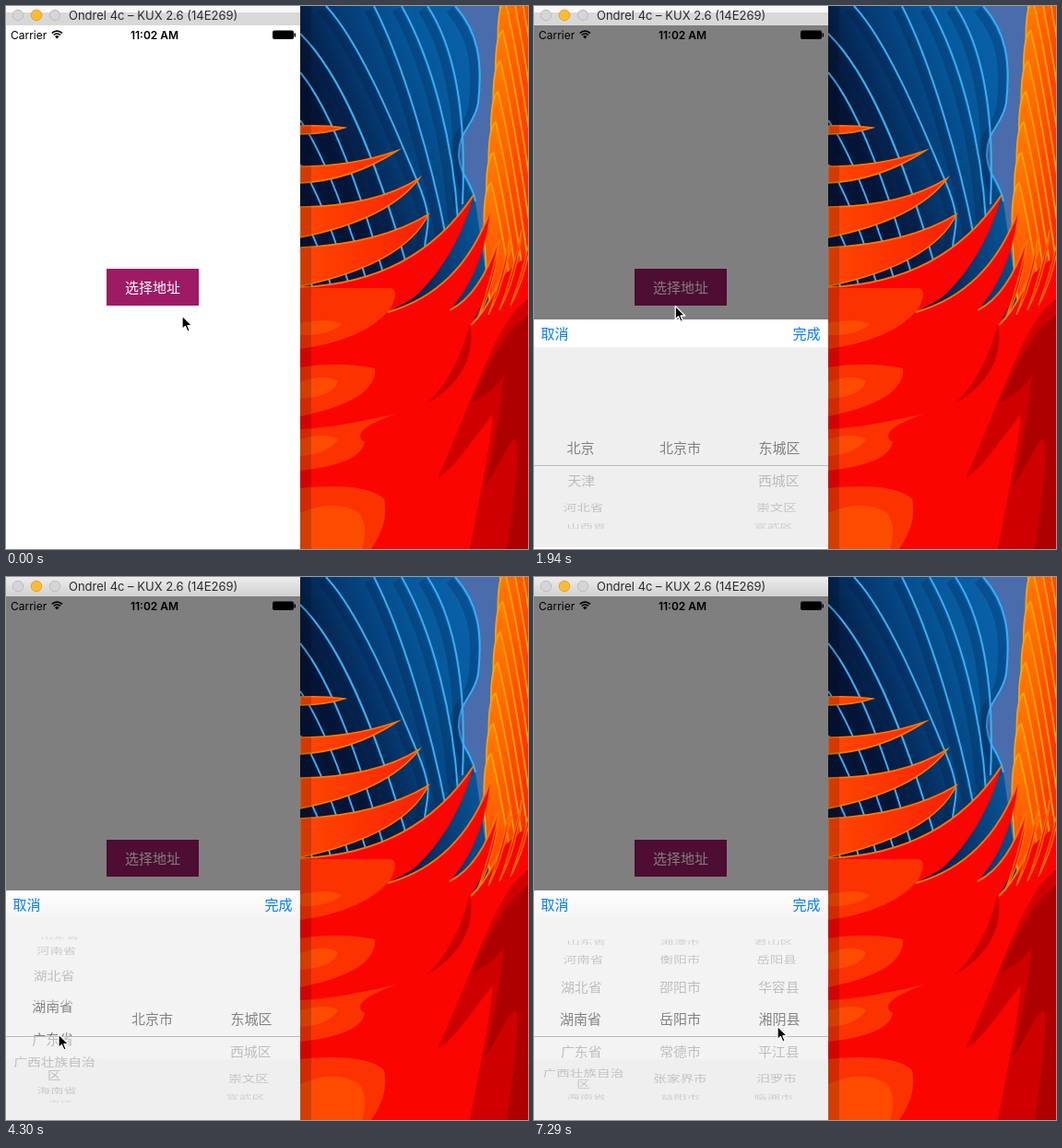
Animation of 566 by 589 pixels, one loop 8 s. Source, as an HTML page with a canvas:

```html
<!DOCTYPE html>
<html lang="zh-CN">
<head>
<meta charset="utf-8">
<title>选择地址</title>
<style>
html, body { margin: 0; width: 566px; height: 589px; overflow: hidden; background: #fff; }
canvas { display: block; }
</style>
</head>
<body>
<canvas id="stage" width="566" height="589"></canvas>
<script>
const stage = document.getElementById('stage');
const LOOP = 8000, STEP = 148.6;
const HAN = '"Noto Sans CJK SC", "Noto Sans CJK", "Noto Sans CJK JP", sans-serif';
const LATIN = 'Inter, Roboto, sans-serif';
let c = stage.getContext('2d');

const PROVINCES = '北京 天津 河北省 山西省 内蒙古自治区 辽宁省 吉林省 黑龙江省 上海 江苏省 浙江省 安徽省 福建省 江西省 山东省 河南省 湖北省 湖南省 广东省 广西壮族自治区 海南省 重庆 四川省 贵州省'.split(' ');
const CITIES = ['北京市', '长沙市 株洲市 湘潭市 衡阳市 邵阳市 岳阳市 常德市 张家界市 益阳市 郴州市'].map(s => s.split(' '));
const AREAS = [
  '东城区 西城区 崇文区 宣武区 朝阳区',
  '芙蓉区 天心区 岳麓区 开福区 雨花区',
  '岳阳楼区 云溪区 君山区 岳阳县 华容县 湘阴县 平江县 汨罗市 临湘市'
].map(s => s.split(' '));

// Key lists: time, then one or more values
const CURSOR = [
  [0, 191, 336], [150, 190, 334], [740, 163, 299], [1790, 163, 299], [1935, 153, 326],
  [2380, 66, 533], [2980, 62, 512], [3270, 60, 490], [3560, 58, 528], [3860, 57, 500],
  [4300, 57, 496], [4600, 57, 496], [5050, 168, 508], [5490, 168, 479], [5790, 168, 479],
  [6090, 264, 520], [6390, 264, 520], [6840, 264, 496], [7290, 264, 487]
];
const PROVINCE_ROLL = [[2230, 0], [2380, .7], [2680, 4], [2980, 7.6], [3270, 10.4], [3560, 12.5], [3860, 15], [4160, 17.1], [4300, 17.42], [4460, 17]];
const CITY_ROLL = [[4900, 0], [5050, .6], [5340, 3.2], [5490, 4.21], [5640, 4.75], [5790, 5]];
const AREA_ROLL = [[6240, 0], [6390, .8], [6690, 3.7], [6840, 4.3], [6990, 4.3], [7140, 4.7], [7280, 5]];

function tween(keys, t) {
  const i = keys.findIndex(k => k[0] > t);
  if (i < 0) return keys[keys.length - 1].slice(1);
  if (i === 0) return keys[0].slice(1);
  const a = keys[i - 1], b = keys[i], p = (t - a[0]) / (b[0] - a[0]);
  return a.slice(1).map((v, n) => v + (b[n + 1] - v) * p);
}

function rect(x, y, w, h, fill) {
  c.fillStyle = fill;
  c.fillRect(x, y, w, h);
}

function disc(x, y, r, fill, line) {
  c.beginPath();
  c.arc(x, y, r, 0, 7);
  c.fillStyle = fill;
  c.fill();
  c.strokeStyle = line;
  c.lineWidth = 1;
  c.stroke();
}

function fade(x0, y0, x1, y1, ...stops) {
  const g = c.createLinearGradient(x0, y0, x1, y1);
  stops.forEach((s, i) => g.addColorStop(i / (stops.length - 1), s));
  return g;
}

function text(s, x, y, font, fill, align = 'left') {
  c.font = font;
  c.fillStyle = fill;
  c.textAlign = align;
  c.fillText(s, x, y);
}

const han = (s, x, y, fill, align = 'center') => text(s, x, y + 5.7, '15px ' + HAN, fill, align);

function shape(d, fill, line, width = 1) {
  const p = new Path2D(d);
  if (fill) { c.fillStyle = fill; c.fill(p); }
  if (line) { c.strokeStyle = line; c.lineWidth = width; c.stroke(p); }
}

function wallpaper() {
  rect(319, 0, 247, 589, fade(325, 90, 500, 20, '#041536', '#053a72', '#055799', '#0a62ab'));
  // dark folds and bright ridges
  const ridges = [
    'M487 0C512 28 517 60 512 105C508 130 490 135 491 163C493 185 506 192 509 212',
    'M457 0C490 50 499 130 495 215',
    'M429 0C463 60 485 150 490 232',
    'M399 0C430 60 462 170 477 250',
    'M347 0C385 40 425 140 446 190S453 240 454 268',
    'M319 30C362 72 400 160 437 290',
    'M319 72C352 112 385 200 413 305',
    'M319 124C345 160 374 240 394 308',
    'M319 172C340 204 360 260 374 310',
    'M319 226C334 246 346 280 354 310',
    'M319 277L334 308'
  ];
  shape(ridges[0] + 'L520 290L560 240V0Z', '#4a6cab');
  ridges.forEach(d => {
    c.save();
    c.translate(-6, 4);
    shape(d, null, 'rgba(0,18,55,.22)', 9);
    c.restore();
    shape(d, null, '#39aef4', 2);
  });

  // right-hand plume: overlapping leaves, each lower and further left
  for (let i = -9; i < 7; i++) {
    const x = 536 - i * 2.5, y = i * 33 + 2;
    shape(`M${x + 5} ${y - 8}C${x - 6} ${y} ${x - 3} ${y + 50} ${x + 1} ${y + 100}Q${x + 12} ${y + 190} ${x + 26} ${y + 250}L${x + 44} ${y + 220}Q${x + 20} ${y + 50} ${x + 5} ${y - 8}Z`,
      fade(x, y, x + 12, y + 240, '#ff7a00', '#ff4300', '#ec1700'), '#ffa300', 1.8);
  }

  // blades reaching in from the left
  [
    'M319 130Q345 129 367 132Q345 139 319 139Z',
    'M319 174Q375 174 424 157Q375 189 319 192Z',
    'M319 218Q400 217 448 187Q414 232 319 251Z',
    'M319 262Q405 258 458 226Q432 280 319 304Z'
  ].forEach(d => shape(d, fade(319, 0, 450, 0, '#ff4700', '#fa2200'), '#ff7a00', 1.5));

  // red body and the spikes along its top
  const red = '#fa0500';
  shape('M319 305C400 302 464 270 507 205C497 245 472 292 440 318L414 332C470 316 505 277 525 222C521 265 504 306 481 330C505 318 522 290 534 253C530 290 520 320 504 346C520 334 532 306 542 290L566 270V589H319Z', red);
  shape('M319 305C400 302 464 270 507 205M414 332C470 316 505 277 525 222M481 330C505 318 522 290 534 253M504 346C524 328 540 290 549 258', null, '#ff7600', 2);
  for (let i = 0; i < 4; i++) {
    const x = 535 + i * 12, y = 252 - i * 5;
    shape(`M${x} ${y}Q${x - 4} ${y + 50} ${x - 24} ${y + 88}Q${x - 8} ${y + 45} ${x} ${y}Z`, red, '#ff7600', 1.3);
  }

  // warm glows
  shape('M319 306H418Q426 310 417 328Q390 362 319 372Z', '#fc3200');
  shape('M319 344Q350 338 364 345Q350 358 319 357Z', '#ff4b00');
  shape('M319 392Q360 385 400 393Q403 428 319 445Z', '#fc3200');
  shape('M319 408Q345 398 360 407Q355 424 319 426Z', '#ff4b00');
  shape('M319 459Q355 458 424 442Q370 461 389 473Q385 497 319 504Z', '#fc3200');
  shape('M319 470Q345 462 360 470Q350 486 319 488Z', '#ff4b00');
  shape('M319 523Q390 516 410 535Q416 560 396 589H319Z', '#fc3200');
  shape('M319 550Q355 534 382 549Q394 564 386 589H319Z', '#ff4b00');

  // deep folds
  shape('M503 346C510 380 491 412 457 431C484 405 494 374 503 346Z', '#c90000');
  shape('M566 318C530 345 518 400 468 512C488 500 507 468 524 448C535 420 517 520 503 589H566Z', '#cf0000');
  shape('M566 335C545 350 526 380 504 430C520 423 533 414 540 400C535 450 527 488 518 521C538 500 551 450 555 480Q552 530 543 589H566Z', '#ae0000');
  rect(319, 0, 12, 589, 'rgba(0,0,0,.17)');
}

const backdrop = document.createElement('canvas');
backdrop.width = 566;
backdrop.height = 589;
const screen = c;
c = backdrop.getContext('2d');
wallpaper();
c = screen;

function titleBar(late) {
  rect(0, 0, 319, 21, late ? fade(0, 0, 0, 20, '#ececec', '#d2d2d2') : '#d8d8d8');
  if (!late) rect(0, 0, 319, 7, '#f8f8f8');
  disc(13, 10, 5.7, '#d5d5d5', '#bdbdbd');
  disc(33, 10, 5.8, '#fdbc2e', '#e2a12a');
  disc(53, 10, 5.7, '#d5d5d5', '#bdbdbd');
  text('Ondrel 4c – KUX 2.6 (14E269)', 68, 15, '13px ' + LATIN, '#2b2b2b');
}

function statusBar() {
  text('Carrier', 5, 35.5, '12px ' + LATIN, '#000');
  text('11:02 AM', 161, 35.5, '600 12px ' + LATIN, '#000', 'center');
  c.strokeStyle = '#000';
  c.lineWidth = 1.7;
  [7.8, 5].forEach(r => {
    c.beginPath();
    c.arc(55.3, 35, r, -2.36, -.78);
    c.stroke();
  });
  shape('M55.3 35.5L53 33Q55.3 31 57.6 33Z', '#000');
  c.beginPath();
  c.roundRect(289, 26.5, 23, 9.5, 2);
  c.fill();
  rect(312.5, 29.5, 1.5, 4, '#000');
}

function wheel(rows, x, roll, focus) {
  rows.forEach((name, i) => {
    const a = (i - roll) * .4014;
    if (Math.abs(a) > 1.45) return;
    const k = Math.cos(a), zoom = 1 - .09 * (1 - k);
    const lines = name.length > 6 ? [name.slice(0, 6), name.slice(6)] : [name];
    c.save();
    c.translate(158 + (x - 158) * zoom, 479.7 + 90 * Math.sin(a));
    c.scale(zoom, k);
    const ink = focus ? 'rgba(0,0,0,.46)' : `rgba(0,0,0,${.11 + .12 * k})`;
    lines.forEach((s, n) => han(s, 0, (n - (lines.length - 1) / 2) * 17.5, ink));
    c.restore();
  });
}

function clipped(x, y, w, h, draw) {
  c.save();
  c.beginPath();
  c.rect(x, y, w, h);
  c.clip();
  draw();
  c.restore();
}

function sheet(t, late) {
  rect(0, 340, 319, 247, late ? '#f3f3f3' : '#efefef');
  rect(0, 340, 319, 30, late ? fade(0, 340, 0, 370, '#fff', '#f4f4f4') : '#fff');
  if (late) rect(0, 523, 319, 66, '#efefef');
  han('取消', 7.5, 355, '#007aff', 'left');
  han('完成', 310.5, 355, '#007aff', 'right');
  const moved = t >= 4590;
  const columns = [
    [PROVINCES, 50.5, tween(PROVINCE_ROLL, t)[0]],
    [CITIES[moved ? 1 : 0], 158.5, tween(CITY_ROLL, t)[0]],
    [AREAS[t >= 5930 ? 2 : moved ? 1 : 0], 266, tween(AREA_ROLL, t)[0]]
  ];
  const spin = focus => columns.forEach(col => wheel(...col, focus));
  clipped(0, 390, 319, 72, () => spin(false));
  clipped(0, 498, 319, 72, () => spin(false));
  clipped(0, 462, 319, 36, () => spin(true));
  rect(0, 498, 319, 1, '#bdbdbd');
}

function pointer(x, y) {
  c.save();
  c.translate(x, y);
  c.lineJoin = 'round';
  shape('M0 0V14.5L3.4 11.4L5.8 17L8.2 16L5.9 10.6H10.6Z', '#000', '#fff', 1.3);
  c.restore();
}

function draw(now) {
  const t = Math.floor((now % LOOP + 15) / STEP) * STEP;
  const late = t > 2000;
  c.drawImage(backdrop, 0, 0);
  rect(0, 0, 319, 589, '#fff');
  rect(109, 285, 100, 40, '#9d1b65');
  const pressed = t > 850 && t < 1300;
  han('选择地址', 159, 305, pressed ? 'rgba(255,255,255,.2)' : '#fff');
  if (t > 1000) rect(0, 21, 319, 566, 'rgba(0,0,0,.5)');
  statusBar();
  titleBar(late);
  if (t > 1100) {
    const p = Math.min(1, (t - 1040) / 297);
    clipped(0, 21, 319, 568, () => {
      c.translate(0, 249 * (1 - p * p * (3 - 2 * p)));
      sheet(t, late);
    });
  }
  pointer(...tween(CURSOR, t));
}

let start;
function tick(now) {
  if (start === undefined) start = now;
  draw(now - start);
  requestAnimationFrame(tick);
}
draw(0);
requestAnimationFrame(tick);
</script>
</body>
</html>
```
